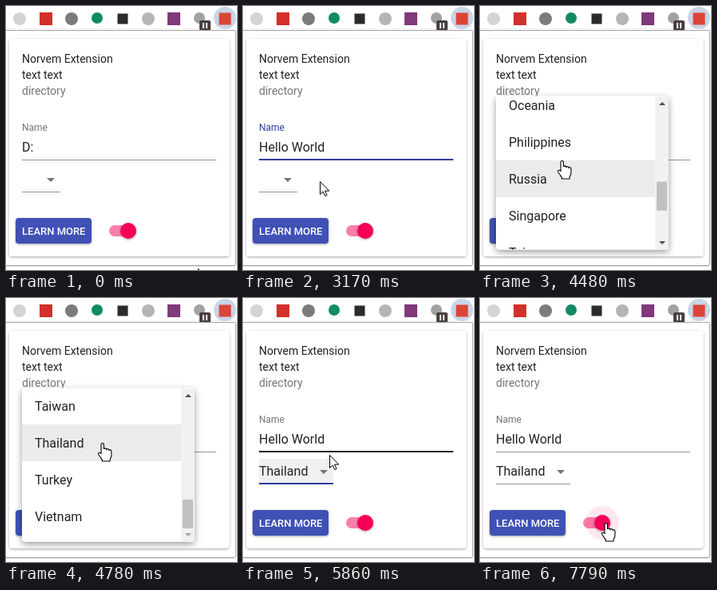
Write an HTML page that moves like this. It is 289 by 330 pixels and loops after 8180 ms.

```html
<!DOCTYPE html>
<html lang="en">
<head>
<meta charset="utf-8">
<title>Extension popup</title>
<style>
html, body { margin: 0; width: 100%; height: 100%; overflow: hidden; background: #fff; }
svg { display: block; width: 289px; height: 330px; font-family: Roboto, Arial, sans-serif; }
text { white-space: pre; }
.body { font-size: 14px; fill: #212121; }
.field { font-size: 16px; fill: #212121; }
.grey { fill: #757575; }
</style>
</head>
<body>
<svg viewBox="0 0 289 330">
  <defs>
    <filter id="soft" x="-20%" y="-20%" width="140%" height="150%">
      <feDropShadow dx="0" dy="1" stdDeviation="1.7" flood-opacity=".36"/>
    </filter>
    <filter id="deep" x="-20%" y="-20%" width="140%" height="150%">
      <feDropShadow dx="0" dy="3" stdDeviation="4" flood-opacity=".4"/>
    </filter>
    <clipPath id="listClip"><rect x="20" y="112.5" width="199" height="192" rx="3"/></clipPath>
  </defs>

  <rect width="289" height="330" fill="#fff"/>
  <rect y="28" width="289" height="1" fill="#f0f0f0"/>
  <g id="toolbar"></g>

  <path d="M0 30.5H286.5Q287.5 30.5 287.5 32V322Q287.5 324.5 285 324.5H0" fill="#fff" stroke="#a4a4a4"/>
  <path d="M0 325.5H286" stroke="#e2e2e2"/>
  <rect x="4" y="41" width="275.5" height="272" rx="4" fill="#fff" filter="url(#soft)"/>

  <text class="body" x="20" y="71">Norvem Extension</text>
  <text class="body" x="20" y="91">text text</text>
  <text class="body grey" x="20" y="111">directory</text>

  <text id="label" x="20" y="156" font-size="12">Name</text>
  <rect id="selection" x="20" y="167" width="14.5" height="19" fill="#3390ff"/>
  <text id="value" class="field" x="20" y="182"></text>
  <rect id="caret" y="167" width="1" height="19" fill="#111"/>
  <rect x="20" y="192" width="243" height="1" fill="#949494"/>
  <rect id="nameHover" x="20" y="191" width="243" height="2" fill="#212121"/>
  <rect id="nameLine" y="191" height="2" fill="#303f9f"/>

  <rect id="selectBack" x="20" y="201" height="31" fill="#f0f0f0"/>
  <text id="choice" class="field" x="20" y="222"></text>
  <path id="selectArrow" d="M-5 0H5L0 5z" fill="#757575"/>
  <rect id="selectBase" x="20" y="232" height="1" fill="#949494"/>
  <rect id="selectLine" y="231" height="2" fill="#303f9f"/>

  <rect id="button" x="12" y="265" width="95" height="32" rx="4" filter="url(#soft)"/>
  <text x="20" y="286" font-size="13" font-weight="500" fill="#fff">LEARN MORE</text>

  <rect x="129" y="274" width="34" height="14" rx="7" fill="#fa80ab"/>
  <circle id="ripple" cx="153" cy="281" fill="#f50057"/>
  <circle cx="153" cy="281" r="10" fill="#f50057" filter="url(#soft)"/>

  <g id="menu">
    <rect x="20" y="112.5" width="216" height="192" rx="4" fill="#fff" filter="url(#deep)"/>
    <g clip-path="url(#listClip)">
      <rect id="rowBack" x="20" width="199" height="46" fill="#ebebeb"/>
      <g id="rows"></g>
    </g>
    <rect x="219" y="113" width="17" height="191.5" fill="#f1f1f1"/>
    <rect id="thumb" x="221" width="13" height="36" fill="#c1c1c1"/>
    <path id="upArrow" d="M224 124h8l-4-4z"/>
    <path id="downArrow" d="M224 294h8l-4 4z"/>
  </g>

  <g id="cursor">
    <circle id="click" r="12" fill="#ff0" fill-opacity=".47"/>
    <path id="arrow" d="M.5 .5V16.5L4.2 13 6.7 18.6 9 17.6 6.6 12.1H11.7z" fill="#fff" stroke="#000"/>
    <path id="hand" d="M-2 13.3V2.2a1.7 1.7 0 0 1 3.4 0V7.8q.5-1 1.8-.9 1.4.1 1.6 1.4.6-.8 1.7-.6 1.4.2 1.5 1.4.5-.6 1.5-.4 1.4.3 1.4 1.8V15.5q0 2-1 3.5-.9 1.4-.9 4H-.6q0-2.3-1.6-4L-5.2 14.8q-1-1.6.2-2.4 1.2-.6 3 .9z" fill="#fff" stroke="#000" stroke-width="1.1"/>
    <path id="ibeam" d="M-3 -7.5H-1L0 -6.5 1 -7.5H3M0 -6.5V6.5M-3 7.5H-1L0 6.5 1 7.5H3" fill="none" stroke="#000" stroke-width="1.2"/>
  </g>
</svg>
<script>
const LOOP = 8180, TICK = 77.1;
const ROW = 46, LIST_TOP = 120, MAX_SCROLL = 652;
const NS = 'http://www.w3.org/2000/svg';
const $ = id => document.getElementById(id);

function set(id, attrs) {
  for (const key in attrs) $(id).setAttribute(key, attrs[key]);
}
function add(parent, tag, attrs, text = '') {
  const node = document.createElementNS(NS, tag);
  for (const key in attrs) node.setAttribute(key, attrs[key]);
  node.textContent = text;
  $(parent).append(node);
}
const show = (id, on) => set(id, { visibility: on ? 'visible' : 'hidden' });
const clamp = v => Math.max(0, Math.min(1, v));
const ramp = (t, from, to) => clamp((t - from) / (to - from));
const easeOut = v => 1 - (1 - v) ** 3;
const between = (t, from, to) => t >= from && t < to;

const disc = (x, y, r, fill) => add('toolbar', 'circle', { cx: x, cy: y, r, fill });
const box = (x, y, size, fill) =>
  add('toolbar', 'rect', { x: x - size / 2, y: y - size / 2, width: size, height: size, fill });

disc(17, 16, 8, '#d4d4d4');
box(50, 16, 16, '#d2302c');
disc(82, 16, 8, '#7b7b7b');
disc(114, 15, 7, '#128a66');
box(146, 16, 13, '#2b2b2b');
disc(178, 16, 8, '#b5b5b5');
box(210, 16, 16, '#80397b');
disc(242, 15, 7, '#a2a2a2');
add('toolbar', 'rect', { x: 242, y: 18, width: 14, height: 13, rx: 2, fill: '#4a3f3f' });
for (const x of [246, 250]) add('toolbar', 'rect', { x, y: 21, width: 2, height: 7, fill: '#fff' });
disc(274, 15, 14, '#c8d5e7');
box(274, 16, 15, '#dc4437');

const regions = ['Auto Detect', 'Brazil', 'Europe West', 'Europe Nordic & East', 'Indonesia',
  'Japan', 'Korea', 'Latin America North', 'Latin America South', 'North America', 'Oceania',
  'Philippines', 'Russia', 'Singapore', 'Taiwan', 'Thailand', 'Turkey', 'Vietnam'];
regions.forEach((name, i) =>
  add('rows', 'text', { class: 'field', x: 36, y: LIST_TOP + i * ROW + 29 }, name));

// Pointer stops: time, x, y
const stops = [
  [80, 240, 328], [200, 222, 296], [400, 135, 195], [470, 113, 181], [2800, 113, 181],
  [2950, 97, 181], [3030, 90, 181], [3170, 97, 219], [3330, 58, 218], [3560, 58, 218],
  [3800, 76, 232], [4020, 80, 208], [4120, 80, 208], [4780, 121, 181], [4870, 121, 181],
  [4940, 120, 182], [5640, 120, 182], [5865, 108, 196], [6240, 108, 209], [6560, 101, 250],
  [6720, 98, 275], [6950, 130, 284], [7110, 157, 283], [7180, 154, 282], [7255, 151, 281],
  [7490, 151, 281], [7780, 158, 281]
];
function pointerAt(t) {
  const i = stops.findIndex(s => s[0] > t);
  if (i === 0) return stops[0].slice(1);
  if (i < 0) return stops[stops.length - 1].slice(1);
  const [a, b] = [stops[i - 1], stops[i]], k = ramp(t, a[0], b[0]);
  return [1, 2].map(n => Math.round(a[n] + (b[n] - a[n]) * k));
}

const keyTimes = [1230, 1380, 1460, 1610, 1780, 1850, 2170, 2240, 2320, 2400, 2480];
function typed(t) {
  return t < keyTimes[0] ? 'D:' : 'Hello World'.slice(0, keyTimes.filter(k => k <= t).length);
}

function centredLine(id, left, width, scale) {
  set(id, { x: left + width * (1 - scale) / 2, width: width * scale });
}

function drawField(t) {
  const focused = between(t, 530, 3480), selected = between(t, 770, 1230);
  set('label', { fill: focused ? '#303f9f' : '#757575' });
  $('value').textContent = typed(t);
  set('value', { style: selected ? 'fill:#fff' : '' });
  show('selection', selected);
  show('caret', between(t, 530, 2860) && !selected);
  set('caret', { x: Math.round(20 + $('value').getComputedTextLength()) });
  centredLine('nameLine', 20, 243, easeOut(ramp(t, 510, 690)) * (1 - ramp(t, 3480, 3680)));
  set('nameHover', { opacity: ramp(t, 5600, 5800) * (1 - ramp(t, 5950, 6150)) });
}

function drawSelect(t) {
  const chosen = t >= 5480, width = chosen ? 93 : 48;
  $('choice').textContent = chosen ? 'Thailand' : '';
  set('selectBack', { width });
  show('selectBack', between(t, 3480, 6160));
  set('selectBase', { width });
  set('selectArrow', { transform: `translate(${8 + width} 215)` });
  centredLine('selectLine', 20, width, easeOut(ramp(t, 3480, 3680)) * (1 - ramp(t, 6010, 6210)));
}

function drawMenu(t, y) {
  const grow = easeOut(ramp(t, 3480, 3780));
  const opacity = grow * (1 - ramp(t, 5440, 5800));
  const k = ramp(t, 4060, 4700), scroll = MAX_SCROLL * k * k * (3 - 2 * k);
  const row = Math.floor((y + 5 - LIST_TOP + scroll) / ROW);
  set('menu', {
    opacity,
    transform: `translate(128 212) scale(${.75 + .25 * grow} ${.56 + .44 * grow}) translate(-128 -212)`
  });
  show('menu', opacity > 0);
  set('rows', { transform: `translate(0 ${-scroll})` });
  set('rowBack', { y: LIST_TOP + row * ROW - scroll });
  set('thumb', { y: 130 + 122 * scroll / MAX_SCROLL });
  set('upArrow', { fill: scroll > 0 ? '#505050' : '#a3a3a3' });
  set('downArrow', { fill: scroll < MAX_SCROLL ? '#505050' : '#a3a3a3' });
}

function drawPointer(t, x, y) {
  const menuOpen = between(t, 3480, 5560);
  const overField = !menuOpen && y > 160 && y < 193;
  const overSelect = x < (t < 5480 ? 68 : 113) && y > 200 && y < 233;
  const overButton = x < 107 && y > 264 && y < 298;
  const overSwitch = x > 126 && x < 177 && y > 258 && y < 305;
  const kind = overField ? 'ibeam'
    : menuOpen || overSelect || overButton || overSwitch ? 'hand' : 'arrow';
  for (const id of ['arrow', 'hand', 'ibeam']) show(id, id === kind);
  show('click', [530, 3400, 5320, 7410].some(c => between(t, c, c + (c > 5000 ? 155 : 77))));
  set('cursor', { transform: `translate(${x} ${y})` });
  set('button', { fill: overButton ? '#303f9f' : '#3f51b5' });
}

function draw(time) {
  const t = Math.floor((time + 10) / TICK) * TICK + 12;
  const [x, y] = pointerAt(t);
  drawField(t);
  drawSelect(t);
  drawMenu(t, y);
  drawPointer(t, x, y);
  const glow = ramp(t, 7490, 7790);
  set('ripple', { r: 14 + 7 * glow, opacity: .09 * glow });
}

const start = performance.now();
function frame() {
  draw((performance.now() - start) % LOOP);
  requestAnimationFrame(frame);
}
frame();
</script>
</body>
</html>
```
